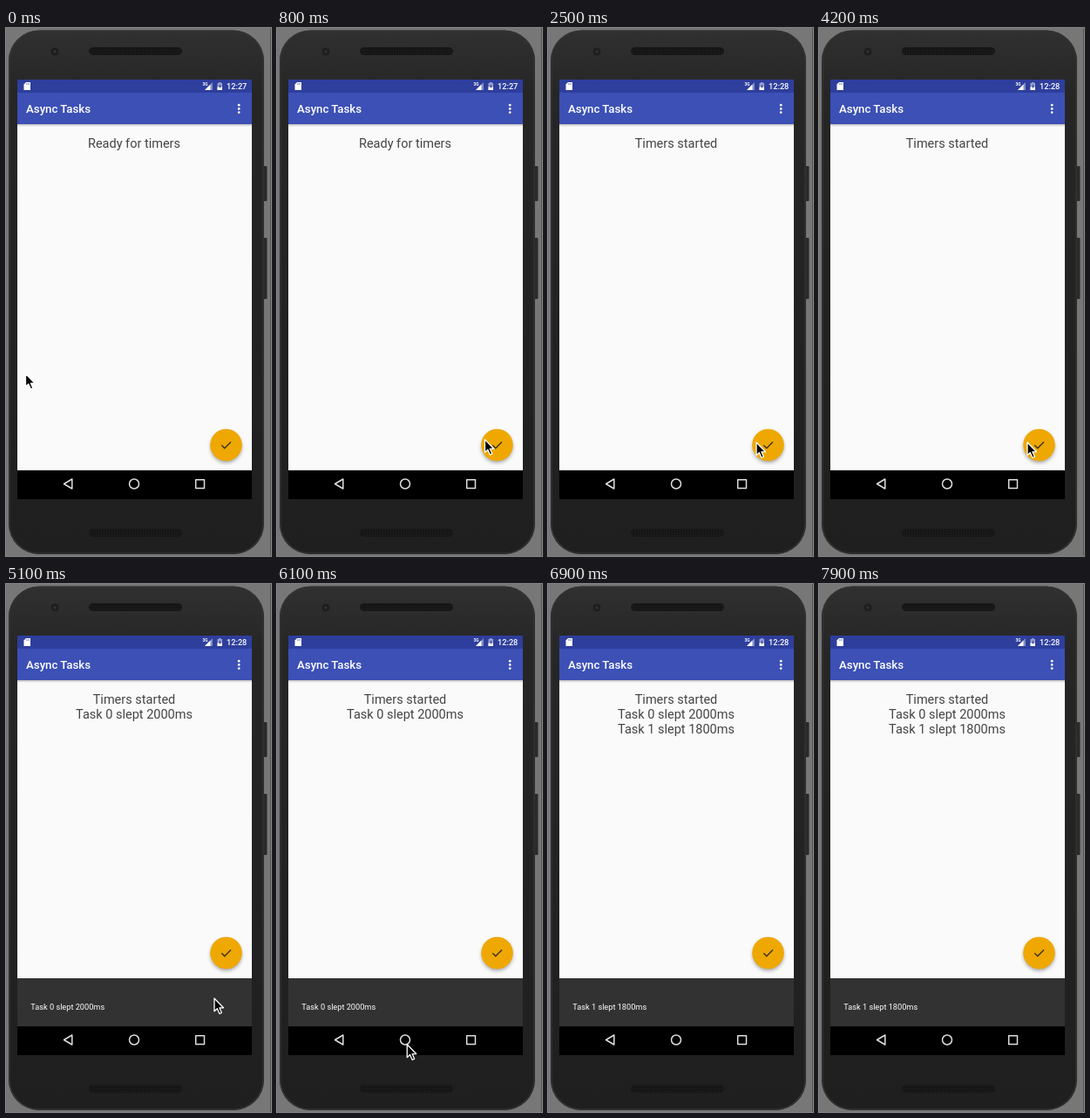
These frames come from a looping animation (304 by 604 pixels, 8 s). An HTML page:

```html
<!DOCTYPE html>
<html lang="en">
<head>
<meta charset="utf-8">
<title>Async Tasks</title>
<style>
  html, body { margin: 0; width: 100%; height: 100%; overflow: hidden; background: #777; }
  svg { display: block; width: 304px; height: 604px; font-family: Roboto, sans-serif; }
  .title { font-size: 13.25px; font-weight: 500; fill: #fff; }
  .clock { font-size: 9.2px; font-weight: 500; fill: #fff; }
  .log { font-size: 14.5px; fill: #444; text-anchor: middle; }
  .snack { font-size: 9.2px; fill: #fff; }
</style>
</head>
<body>
<svg viewBox="0 0 304 604">
  <defs>
    <linearGradient id="body" x2="0" y2="1">
      <stop offset="0" stop-color="#303030"/>
      <stop offset=".12" stop-color="#262626"/>
      <stop offset="1" stop-color="#1f1f1f"/>
    </linearGradient>
    <linearGradient id="drop" x2="0" y2="1">
      <stop offset="0" stop-color="#000" stop-opacity=".24"/>
      <stop offset="1" stop-color="#000" stop-opacity="0"/>
    </linearGradient>
    <pattern id="mesh" width="3" height="3" patternUnits="userSpaceOnUse">
      <rect width="3" height="3" fill="#151515"/>
      <circle cx="1.5" cy="1.5" r=".7" fill="#222"/>
    </pattern>
    <filter id="blur" x="-50%" y="-50%" width="200%" height="200%">
      <feGaussianBlur stdDeviation="1.9"/>
    </filter>
    <clipPath id="screen"><rect x="13" y="59" width="269" height="480"/></clipPath>
  </defs>

  <!-- phone -->
  <rect width="304" height="604" fill="#777"/>
  <rect x="303" width="1" height="604" fill="#555"/>
  <g fill="#2a2a2a">
    <rect x="295" y="158" width="4.5" height="40" rx="1"/>
    <rect x="295" y="240" width="4.5" height="70" rx="1"/>
  </g>
  <rect x="3" y="2.500" width="293" height="599.500" rx="35" fill="url(#body)"/>
  <rect x="4" y="3.500" width="291" height="597.500" rx="34" fill="none" stroke="#333" stroke-width="1.500"/>
  <circle cx="56" cy="27" r="4.800" fill="#1d1d1d" stroke="#2e2e2e" stroke-width=".8"/>
  <circle cx="56" cy="27" r="1.800" fill="#303236"/>
  <g fill="url(#mesh)" stroke="#161616">
    <rect x="95.5" y="22.5" width="106" height="8" rx="4"/>
    <rect x="95.5" y="573.5" width="106" height="8" rx="4"/>
  </g>

  <g clip-path="url(#screen)">
    <rect x="13" y="59" width="269" height="448" fill="#fafafa"/>
    <rect x="13" y="110" width="269" height="3" fill="url(#drop)"/>
    <rect x="13" y="73" width="269" height="37" fill="#3c50b6"/>
    <rect x="13" y="59" width="269" height="15" fill="#2e3e9c"/>

    <!-- status bar -->
    <path d="M23 62h5v9h-7.500v-6.500z" fill="#fff"/>
    <path d="M23.600 63.200v1.600m1.400-1.600v1.600m1.400-1.600v1.600" stroke="#2e3e9c" stroke-width=".6"/>
    <path d="M237 62v9h-9z" fill="#fff" fill-opacity=".4"/>
    <path d="M234.500 64.500v6.500h-6.500z" fill="#fff"/>
    <text x="225.500" y="66" font-size="4.800" font-weight="700" fill="#fff">3G</text>
    <path d="M244 62h2.500v1h1.500v8h-5.500v-8h1.500z" fill="#fff" fill-opacity=".5"/>
    <path d="M242.500 67.500h5.500v3.500h-5.500z" fill="#fff"/>
    <path d="M245.700 64l-1.700 3.200h1.200v2.400l1.700-3.300h-1.200z" fill="#2e3e9c"/>
    <text id="clock" class="clock" x="253" y="70">12:27</text>

    <text class="title" x="23" y="97.300">Async Tasks</text>
    <g fill="#fff">
      <circle cx="267.200" cy="88.200" r="1.350"/>
      <circle cx="267.200" cy="92.400" r="1.350"/>
      <circle cx="267.200" cy="96.600" r="1.350"/>
    </g>

    <text id="line0" class="log" x="147" y="136.800">Ready for timers</text>
    <text id="line1" class="log" x="147" y="153.700">Task 0 slept 2000ms</text>
    <text id="line2" class="log" x="147" y="170.600">Task 1 slept 1800ms</text>

    <g id="snack">
      <rect x="13" y="451" width="269" height="56" fill="#323232"/>
      <text id="note" class="snack" x="28.300" y="487"></text>
    </g>

    <g id="fab">
      <circle cx="252.500" cy="479.500" r="17.800" fill="#000" fill-opacity=".36" filter="url(#blur)"/>
      <circle cx="252.500" cy="477" r="18.300" fill="#efa802"/>
      <path d="M247.300 477.300l3.500 3.500 7.200-7.300" fill="none" stroke="#3c3220" stroke-width="1.400"/>
    </g>

    <!-- navigation bar -->
    <rect x="13" y="506" width="269" height="33"/>
    <g fill="none" stroke="#dedede" stroke-width="1.500" stroke-linejoin="round">
      <path d="M75.800 516v11l-9.300-5.500z"/>
      <circle cx="147" cy="521.500" r="5.500"/>
      <rect x="217.700" y="516.700" width="9.800" height="9.800"/>
    </g>
  </g>

  <path id="cursor" d="M0 0v14.800l3.300-3.100 2.600 5.900 2.500-1.100-2.500-5.700h4.600z"
        stroke="#fff" stroke-width="1.300" stroke-linejoin="round"/>
</svg>
<script>
const LOOP = 8000, TICK = 100, SLIDE = 250, HEIGHT = 55;
const START = 2290, DONE0 = 4350, DONE1 = 6184;
const $ = id => document.getElementById(id);
const clamp = v => Math.min(1, Math.max(0, v));
const ramp = (t, from, dur) => clamp((t - from) / dur);
const smooth = p => p * p * (3 - 2 * p);

// cubic-bezier(.4, 0, .2, 1), solved by bisection
function ease(x) {
  if (x <= 0 || x >= 1) return clamp(x);
  let lo = 0, hi = 1;
  for (let i = 0; i < 24; i++) {
    const s = (lo + hi) / 2, r = 1 - s;
    if (1.2 * s * r * r + 0.6 * s * s * r + s * s * s < x) lo = s; else hi = s;
  }
  return smooth(lo);
}

// pointer moves: start, end, x, y
const moves = [
  [150, 900, 249.5, 474.5],
  [1800, 2200, 239, 474],
  [5750, 6450, 59.5, 579.5],
  [6600, 6900, 50, 608]
];

function pointer(t) {
  let x = 22.5, y = 395.5;
  for (const [from, to, nx, ny] of moves) {
    const p = smooth(ramp(t, from, to - from));
    x += (nx - x) * p;
    y += (ny - y) * p;
  }
  return [x, y];
}

// one snackbar leaves before the next one enters
function snackbar(t) {
  const next = DONE1 + SLIDE, second = t >= next;
  const shown = second ? next : DONE0;
  const leave = second ? 0 : ramp(t, DONE1, SLIDE);
  return {
    text: second ? "Task 1 slept 1800ms" : "Task 0 slept 2000ms",
    up: HEIGHT * (ease(ramp(t, shown, SLIDE)) - ease(leave)),
    alpha: ramp(t, shown + 70, 180) * (1 - clamp(leave * SLIDE / 180))
  };
}

const shift = (id, x, y) => $(id).setAttribute("transform", `translate(${x} ${y})`);
const show = (id, on) => $(id).setAttribute("visibility", on ? "visible" : "hidden");

function draw(t) {
  $("clock").textContent = t < 1000 ? "12:27" : "12:28";
  $("line0").textContent = t < START ? "Ready for timers" : "Timers started";
  show("line1", t >= DONE0);
  show("line2", t >= DONE1);
  const bar = snackbar(t);
  $("note").textContent = bar.text;
  $("note").setAttribute("opacity", bar.alpha);
  shift("snack", 0, HEIGHT - bar.up);
  shift("fab", 0, -bar.up);
  shift("cursor", ...pointer(t));
}

const begin = performance.now();
let last = -1;
function loop() {
  const t = Math.floor((performance.now() - begin) % LOOP / TICK) * TICK;
  if (t !== last) draw(last = t);
  requestAnimationFrame(loop);
}
loop();
</script>
</body>
</html>
```
